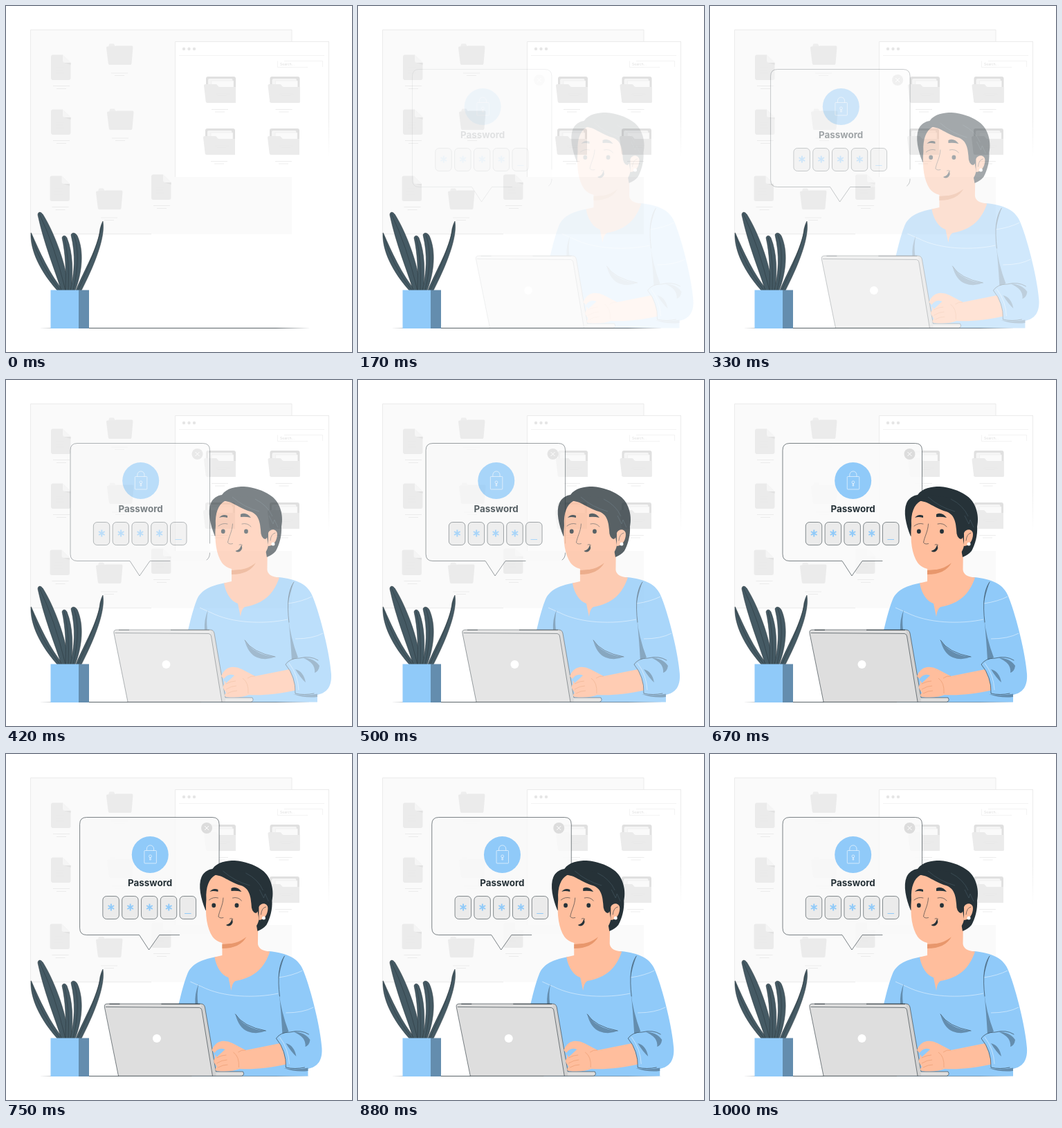
Recreate the animation shown at these times as an HTML page. Size 500 by 500 pixels, loop 1.04 s.

```html
<!DOCTYPE html>
<html lang="en">
<head>
<meta charset="utf-8">
<title>Password prompt</title>
<style>
  html, body { margin: 0; width: 100%; height: 100%; overflow: hidden; background: #fff; }
  svg { display: block; width: 100vw; height: 100vh; }
  text { font-family: Inter, Lato, sans-serif; }
  .ink { fill: none; stroke: #263238; stroke-width: .6; stroke-linecap: round; stroke-linejoin: round; }
  .pale { fill: none; stroke: #ebebeb; stroke-width: 1; }
  .paler { fill: none; stroke: #f0f0f0; stroke-width: .8; }
  .thin { fill: none; stroke: #fff; stroke-width: .6; opacity: .8; }
  .skin { fill: #ffbe9d; }
  .blue { fill: #90caf9; }
  .shade { fill: #648dae; }
  .dark { fill: #263238; }
</style>
</head>
<body>
<svg viewBox="0 0 500 500">
  <defs>
    <linearGradient id="fade" x1="0" y1="0" x2="0" y2="1">
      <stop offset=".55" stop-color="#ebebeb"/>
      <stop offset=".85" stop-color="#ebebeb" stop-opacity="0"/>
    </linearGradient>
    <g id="file">
      <path d="M3 .5H17L28.5 12V34Q28.5 37 25.5 37H3Q0 37 0 34V3.500Q0 .5 3 .5Z" fill="#ebebeb"/>
      <path d="M17 .5L28.500 12H20Q17 12 17 9Z" fill="#f5f5f5"/>
      <path d="M18 11.500L28.500 15V12H20Z" fill="#e2e2e2"/>
      <path d="M7 19H19M7 23H17M7 27H19" stroke="#e5e5e5" stroke-width=".5"/>
    </g>
    <g id="folder">
      <path d="M3 5L4 1.500Q4 .5 6 .5H10.500L13 4V6H3Z" fill="#eee"/>
      <path d="M1.500 4.500H12L14 3.500H37Q38.700 3.500 38.500 5.500L36.500 29Q36.300 31 34.500 31H5Q3 31 2.800 29L0 6.500Q0 4.500 1.500 4.500Z" fill="#ebebeb"/>
    </g>
    <g id="fullFolder">
      <path d="M6 0H43Q46 0 46 3V37H3V3Q3 0 6 0Z" fill="#e0e0e0"/>
      <path d="M8 3H40Q41.500 3 41.500 5V16H6V5Q6 3 8 3Z" fill="#f5f5f5"/>
      <path d="M11 6H43V16H11Z" fill="#fafafa" stroke="#ebebeb" stroke-width=".5"/>
      <path d="M2 11H17Q19 11 20 13T23 15H46V38H5Q3 38 2.700 36L0 13Q0 11 2 11Z" fill="#ebebeb"/>
      <path d="M17 25H37M20 27.500H33" stroke="#e5e5e5" stroke-width=".5"/>
    </g>
    <g id="star">
      <path d="M0-5V5M-4.300-2.500L4.300 2.500M-4.300 2.500L4.300-2.500" stroke="#90caf9" stroke-width="2"/>
    </g>
  </defs>

  <path d="M35.500 34.500H413V329.500H35.500Z" fill="#fafafa"/>
  <path class="pale" d="M413 51V34.500H35.500V329.500H210"/>
  <g id="desktop"></g>
  <path d="M244.500 51.500H467V247H244.500Z" fill="#fff"/>
  <path class="pale" d="M244.500 247V51.500H466.500"/>
  <path d="M466 51H467V247H466Z" fill="url(#fade)"/>
  <g fill="#e6e6e6"><circle cx="257" cy="62" r="2.200"/><circle cx="264.500" cy="62" r="2.200"/><circle cx="272" cy="62" r="2.200"/></g>
  <path class="paler" d="M250 71.500H460M436 88.500H392.500V79.500M402 79.500H457.500V88"/>
  <text x="396" y="86" font-size="5" fill="#dcdcdc">Search...</text>
  <g id="window"></g>

  <path d="M48 465.400L100 465.100H390L440 465.400L390 465.700H100Z" fill="#263238"/>

  <g id="plant" fill="#455a64" stroke="#263238" stroke-width=".5">
    <path d="M36 328C35 346 43 376 74 411H83C64 390 47 352 37 329Q36 327 36 328Z"/>
    <path d="M46 302C46 297 51 296 55 304C66 322 86 366 91 411H80C70 380 55 344 46 302Z"/>
    <path d="M81 335C82 331 86 331 88 335C97 357 97 386 94 411H86C87 380 86 358 81 335Z"/>
    <path d="M94 331C95 327 100 327 103 332C113 354 110 385 100 411H93C99 385 101 360 94 331Z"/>
    <path d="M140 311C143 330 134 362 109 411H101C113 381 133 350 136 322Q138 314 140 311Z"/>
    <path fill="none" d="M37 332Q49 375 78 411M48 300Q70 345 86 411M84 334Q92 365 90 411M98 330Q109 360 97 411M139 316Q130 355 104 411"/>
  </g>
  <path class="blue" d="M64.500 410.500H105.500V466H64.500Z"/>
  <path class="shade" d="M105 410.500H120V466H105Z"/>

  <g id="popup">
    <path d="M115 91.500H296.500Q306.500 91.500 306.500 101.500V251.500Q306.500 261.500 296.500 261.500H220L205 283L191 261.500H115Q105 261.500 105 251.500V101.500Q105 91.500 115 91.500Z" fill="#fafafa" fill-opacity=".88"/>
    <path class="ink" d="M306.500 236V101.500Q306.500 91.500 296.500 91.500H115Q105 91.500 105 101.500V251.500Q105 261.500 115 261.500H191L205 283L220 261.500H249M302 260Q306.500 257 306.500 250"/>
    <circle cx="288.500" cy="107" r="8" fill="#dcdcdc"/>
    <path d="M285.500 104L291.500 110M291.500 104L285.500 110" stroke="#fff"/>
    <circle class="blue" cx="206.700" cy="145.500" r="26.500"/>
    <g fill="none" stroke="#fff" stroke-width=".6">
      <rect x="198.300" y="139.500" width="17.500" height="18.500" rx="1"/>
      <path d="M201.800 139.500V137A5.100 5.100 0 0 1 212 137V139.500M206.500 149.500L206 153H207.800L207.300 149.500"/>
      <circle cx="206.900" cy="147.800" r="1.900"/>
    </g>
    <text x="206.600" y="190.500" text-anchor="middle" font-size="13.400" font-weight="700" fill="#263238">Password</text>
    <g id="boxes"></g>
    <path d="M256.500 230.500H266" stroke="#90caf9"/>
  </g>

  <g id="person">
    <!-- torso -->
    <path class="blue" d="M303 293.500C285 297 270 303 264 317C257 335 254 350 250 366L270 465.500H438V455C452 452 459 443 458 425C456 396 443 343 432 315C425 294 407 288 382 285Z"/>
    <path class="skin" d="M314 262V291L303 293.500C306 310 314 320 323 323L327 342Q328 331 333 328C361 323 375 309 383 285.500Q366 284 365.500 274L366 235Z"/>
    <path d="M314 275Q335 275 349 264Q340 281 314 281Z" fill="#e8976c"/>
    <path class="thin" d="M268 329Q279 334 284 336C315 352 362 353 395 346M396 323Q416 320 430 313M406 374Q431 374 446 366"/>
    <path class="shade" d="M333 376C342 390 356 398 377 400Q364 406 351 401T333 376ZM396 344Q399 372 410 401L401 405Q399 370 396 344ZM280 332Q274 346 275 362H279Q277 346 280 332ZM395 325Q397 302 404 292Q398 310 395 325Z"/>
    <path class="ink" d="M404 292Q392 309 397 350M333 376Q344 394 377 400" stroke-width=".5"/>

    <!-- head -->
    <path class="dark" d="M290 226C283 209 279 190 284 178C287 171 293 167 300 166C307 156 320 154 332 154C347 155 360 160 369 166C383 174 390 194 386 212C387 224 383 238 378 247Q373 253 365 256L355 200Z"/>
    <path class="skin" d="M304 175C295 180 290 192 291 210C289 233 292 252 300 264C307 274 324 277 338 271C353 264 367 248 367 238L365 226L358 190L335 176Z"/>
    <path class="dark" d="M302 175C314 174 322 184 341 190C353 194 355 205 356 216Q356 229 363 230Q367 228 368 216L378 195L350 170L315 167Z"/>
    <path class="skin" d="M367 221C370 214 380 215 380 223C380 231 375 240 367 240Z"/>
    <path class="ink" d="M370 232Q371 222 377 221"/>
    <circle cx="374" cy="237" r="2.500" fill="#fff"/>
    <path d="M315 169Q332 184 354 190M348 172Q366 181 373 197M368 196L374 208L376 202L381 213" fill="none" stroke="#455a64" stroke-width=".6"/>
    <g class="dark">
      <ellipse cx="301.800" cy="218.800" rx="2.900" ry="3.200"/><ellipse cx="335" cy="218.800" rx="2.900" ry="3.200"/>
      <path d="M296 199Q301 193 308 196L308 199Q301 197 296 199ZM327 194Q335 190 342 199Q334 197 327 198Z"/>
      <path d="M319.500 247Q327 245 328 238Q331 243 327 247Q323 250 319.500 247Z"/>
    </g>
    <path class="ink" d="M295 211Q301 206 308 208M329 208Q337 206 342 212M315.500 208C315 219 310 226 308.500 235Q311 238 315.500 236.500M325 238Q327 236.500 329.500 238.500" stroke-width=".9"/>

    <!-- laptop -->
    <path d="M148 361H283Q288 361 289 366L305 459H344Q347 464 342 465.500H164L144 366Q143 361 148 361Z" fill="#dedede"/>
    <path d="M283 361Q288 361 289 366L305 459V465H300L284 367Z" fill="#d2d2d2"/>
    <path class="ink" d="M164 465L144 366Q143 361 148 361H283Q288 361 289 366L305 459H344Q347 464 342 465.300H164M146 365.500L281 366.500Q284 367 284.500 370L300 465"/>
    <path d="M151 361.300H166M226 361.300H282" stroke="#263238" stroke-width=".8"/>
    <circle cx="219.500" cy="411" r="6" fill="#fff"/>

    <!-- forearm and cuff -->
    <path class="skin" d="M299 428Q303 417 313 415Q321 414 329 418L348 428L398 418L408 448C382 454 360 456 339 455Q327 460 306 458Q302 456 306 452L303 447Q300 443 304 439Q302 435 307 432L318 427Q309 423 303 432Z"/>
    <path class="blue" d="M303 432Q309 425 318 427L306 438Z"/>
    <path d="M306 439Q314 435 320 435M306 447Q314 442 321 442M308 453Q315 449 322 449M330 431Q339 437 338 453M348 428Q342 427 337 431" fill="none" stroke="#e8976c" stroke-width=".6"/>
    <path class="blue" d="M392 411Q398 402 412 402Q428 398 440 406Q452 416 456 438Q448 451 433 453Q419 456 406 453Q407 429 392 411Z"/>
    <path class="ink" d="M433 453Q419 456 406 453Q407 429 392 411Q398 402 412 402Q428 398 439 405" stroke-width=".6"/>
    <path class="shade" d="M416 401Q434 402 441 413Q440 421 434 423Q436 409 416 401ZM406 418Q418 421 421 437Q414 431 406 418ZM403 454Q421 457 438 453.500V458Q420 460 403 454Z"/>
    <path class="thin" d="M397 409Q410 426 411 448"/>
  </g>
</svg>
<script>
const el = id => document.getElementById(id);
const LOOP = 1040, STEP = 1000 / 24, TRAVEL = 30, FIRST_STEP = 4;

const icon = (name, x, y, label) =>
  `<use href="#${name}" x="${x}" y="${y}"/>` +
  `<path d="M${x + label.x} ${y + label.y}h24m-19 ${label.gap}h14" fill="none" stroke="#e6e6e6" stroke-width=".7"/>`;

const fileLabel = { x: 3, y: 45.5, gap: 4 };
const folderLabel = { x: 7, y: 43, gap: 3.5 };
const windowLabel = { x: 11, y: 47.5, gap: 3.5 };

el("desktop").innerHTML =
  [[65, 70], [65, 149], [63.5, 245], [210, 243]].map(([x, y]) => icon("file", x, y, fileLabel)).join("") +
  [[145, 54], [146, 148], [130, 263]].map(([x, y]) => icon("folder", x, y, folderLabel)).join("");

el("window").innerHTML =
  [[286, 102], [378.5, 102], [285, 177], [378, 177]].map(([x, y]) => icon("fullFolder", x, y, windowLabel)).join("");

el("boxes").innerHTML = Array.from({ length: 5 }, (_, i) => {
  const x = 138.3 + i * 27.8;
  const star = i < 4 ? `<use href="#star" x="${x + 12}" y="221.500"/>` : "";
  return `<rect x="${x}" y="205.500" width="23.500" height="33" rx="5.500" fill="#ebebeb" stroke="#263238" stroke-width=".55"/>${star}`;
}).join("");

const bezier = (a, b, s) => 3 * a * s * (1 - s) ** 2 + 3 * b * s * s * (1 - s) + s ** 3;

// cubic-bezier(.36, -.01, .5, 1.38): slow start, slight overshoot
function ease(t) {
  let low = 0, high = 1;
  for (let i = 0; i < 24; i++) {
    const mid = (low + high) / 2;
    if (bezier(.36, .5, mid) < t) low = mid; else high = mid;
  }
  return bezier(-.01, 1.38, high);
}

function place(id, x, opacity) {
  el(id).setAttribute("transform", `translate(${x.toFixed(3)} 0)`);
  el(id).setAttribute("opacity", opacity);
}

function draw(ms) {
  const step = Math.min(24, Math.floor((ms + 4) / STEP));
  const p = ease(Math.min(1, step / 24 + .013));
  const opacity = step < FIRST_STEP ? 0 : Math.min(1, p);
  const shift = TRAVEL * (1 - p);
  place("popup", -shift, opacity);
  place("person", shift, opacity);
}

const start = performance.now();
function tick() {
  draw((performance.now() - start) % LOOP);
  requestAnimationFrame(tick);
}
tick();
</script>
</body>
</html>
```
